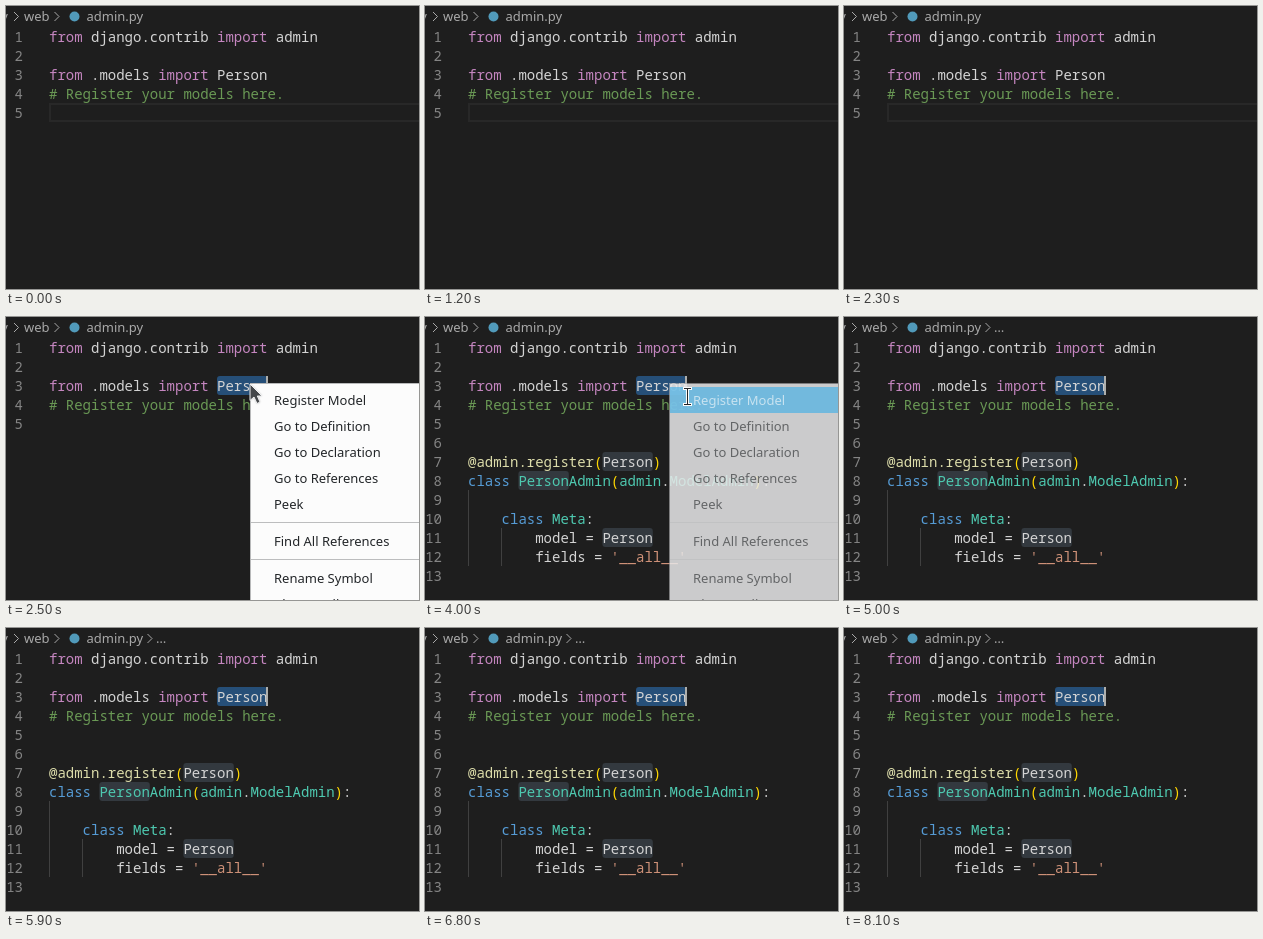
Recreate the animation shown at these times as an HTML page with a canvas. Size 413 by 283 pixels, loop 8.3 s.

```html
<!DOCTYPE html>
<html lang="en">
<head>
<meta charset="utf-8">
<title>Register model</title>
<style>
html, body { margin: 0; width: 100%; height: 100%; overflow: hidden; background: #1e1e1e; }
canvas { display: block; }
</style>
</head>
<body>
<canvas id="stage" width="413" height="283"></canvas>
<script>
const ctx = document.getElementById('stage').getContext('2d');
const W = 413, H = 283, LOOP = 8300, STEP = 100;
const LEFT = 43, TOP = 21, LINE = 19, CHAR = 8.4;
const MONO = '14px "Noto Sans Mono", monospace';
const SANS = '13px "Noto Sans", sans-serif';
const C = {
  bg: '#1e1e1e', text: '#d4d4d4', key: '#c586c0', comment: '#6a9955', cls: '#569cd6',
  type: '#4ec9b0', func: '#dcdcaa', str: '#ce9178', paren: '#ffd700', num: '#858585',
  crumb: '#a9a9a9', guide: '#404040', line: '#282828', caret: '#aeafad',
  select: '#264f78', idle: '#3a3d41', match: '#33393f', dim: '#2a2d30'
};

// Each line: alternating colour and text
const HEAD = [
  ['key', 'from', 'text', ' django.contrib ', 'key', 'import', 'text', ' admin'],
  [],
  ['key', 'from', 'text', ' .models ', 'key', 'import', 'text', ' Person'],
  ['comment', '# Register your models here.'],
  []
];
const ADDED = [
  [],
  ['func', '@admin.register', 'paren', '(', 'text', 'Person', 'paren', ')'],
  ['cls', 'class ', 'type', 'PersonAdmin', 'paren', '(', 'type', 'admin',
    'text', '.', 'type', 'ModelAdmin', 'paren', ')', 'text', ':'],
  [],
  ['cls', '    class ', 'type', 'Meta', 'text', ':'],
  ['text', '        model = Person'],
  ['text', '        fields = ', 'str', "'__all__'"],
  []
];
const MENU = ['Register Model', 'Go to Definition', 'Go to Declaration', 'Go to References',
  'Peek', '-', 'Find All References', '-', 'Rename Symbol', 'Change All Occurrences'];

// Pointer path: time, x, y
const PATH = [
  [600, 405, 61], [1000, 300, 68], [1400, 247, 67], [1500, 246, 67], [2200, 246, 67],
  [2300, 244, 67], [2800, 244, 67], [3300, 262, 79], [4900, 262, 79], [5200, 274, 72],
  [5400, 274, 72], [5900, 238, 34], [6300, 157, 3], [6800, 66, -4], [7200, 66, -4]
];

const lineTop = n => TOP + (n - 1) * LINE;
const colX = c => LEFT + c * CHAR;

function rect(x, y, w, h, color) {
  ctx.fillStyle = color;
  ctx.fillRect(x, y, w, h);
}

function label(str, x, y, color, font = SANS, align = 'left') {
  ctx.font = font;
  ctx.textAlign = align;
  ctx.fillStyle = color;
  ctx.fillText(str, x, y);
}

function wordBox(n, col, color) {
  ctx.fillStyle = color;
  ctx.beginPath();
  ctx.roundRect(colX(col), lineTop(n), 6 * CHAR, LINE, 3);
  ctx.fill();
}

function lineBox(n) {
  ctx.strokeStyle = C.line;
  ctx.lineWidth = 2;
  ctx.strokeRect(LEFT + 1, lineTop(n) + 1, W, LINE - 2);
}

function chevron(x) {
  ctx.strokeStyle = C.crumb;
  ctx.lineWidth = 1;
  ctx.beginPath();
  ctx.moveTo(x, 6);
  ctx.lineTo(x + 4.5, 10.5);
  ctx.lineTo(x, 15);
  ctx.stroke();
}

function breadcrumb(t) {
  label('y', 2, 15, C.crumb, SANS, 'right');
  chevron(8);
  label('web', 18, 15, C.crumb);
  chevron(48.5);
  ctx.fillStyle = '#519aba';
  ctx.beginPath();
  ctx.arc(68.5, 10.5, 5, 0, 7);
  ctx.fill();
  label('admin.py', 80.5, 15, C.crumb);
  if (t >= 4300) {
    chevron(141.5);
    label('…', 150, 15, C.crumb);
  }
}

function codeLine(parts, n) {
  const y = lineTop(n) + 15;
  label(String(n), 17, y, C.num, MONO, 'right');
  let col = 0;
  for (let i = 0; i < parts.length; i += 2) {
    label(parts[i + 1], colX(col), y, C[parts[i]], MONO);
    col += parts[i + 1].length;
  }
}

function caretOn(t) {
  if (t < 1900 || t >= 8100) return false;
  if (t >= 4000) return Math.floor((t - 4000) / 500) % 2 === 0;
  return !(t >= 2900 && t < 3300 || t >= 3800);
}

function editor(t) {
  const added = t >= 4000, blurred = t >= 8100;
  if (t < 1700) lineBox(5);
  else if (t < 1900) lineBox(3);
  else wordBox(3, 20, blurred ? C.idle : C.select);
  if (added) {
    const color = blurred ? C.dim : C.match;
    wordBox(7, 16, color);
    wordBox(8, 6, color);
    wordBox(11, 16, color);
    rect(LEFT, lineTop(9), 1, 4 * LINE, C.guide);
    rect(76, lineTop(11), 1, 2 * LINE, C.guide);
  }
  (added ? HEAD.concat(ADDED) : HEAD).forEach((parts, i) => codeLine(parts, i + 1));
  if (caretOn(t)) rect(260, lineTop(3), 2, LINE, C.caret);
}

function menuAlpha(t) {
  if (t < 2400 || t >= 4400) return 0;
  if (t < 2500) return 0.5;
  if (t < 4000) return 1;
  return [0.62, 0.36, 0.14, 0.03][Math.floor((t - 4000) / STEP)];
}

function menu(t) {
  ctx.globalAlpha = menuAlpha(t);
  if (!ctx.globalAlpha) return;
  rect(244, 66, W, H, '#b8b9ba');
  rect(245, 67, W, H, '#fcfcfc');
  let y = 70;
  MENU.forEach((item, i) => {
    if (item === '-') {
      rect(245, y + 5, W, 1, '#bcbdbe');
      y += 11;
      return;
    }
    const active = i === 0 && t >= 3000;
    if (active) rect(245, y, W, 26, '#3daee9');
    label(item, 268, y + 18, active ? '#fcfcfc' : '#232629');
    y += 26;
  });
  ctx.globalAlpha = 1;
}

function pointerAt(t) {
  const i = PATH.findIndex(p => p[0] > t);
  if (i < 1) return null;
  const [t0, x0, y0] = PATH[i - 1], [t1, x1, y1] = PATH[i];
  const k = (t - t0) / (t1 - t0);
  return [Math.round(x0 + (x1 - x0) * k), Math.round(y0 + (y1 - y0) * k)];
}

function arrow(x, y) {
  const p = new Path2D('M0 0V16.5L4 13L7 19.5L10 18L7.3 12H12Z');
  ctx.save();
  ctx.translate(x, y);
  ctx.shadowColor = 'rgba(0,0,0,.35)';
  ctx.shadowBlur = 2;
  ctx.fillStyle = '#44474a';
  ctx.fill(p);
  ctx.shadowColor = 'transparent';
  ctx.strokeStyle = '#eff0f1';
  ctx.lineWidth = 1;
  ctx.stroke(p);
  ctx.restore();
}

function beam(x, y) {
  for (const [color, pad] of [['#fcfcfc', 1], ['#232629', 0]]) {
    rect(x - pad, y - 8 - pad, 1 + 2 * pad, 17 + 2 * pad, color);
    for (const end of [-8, 8])
      rect(x - 3 - pad, y + end - pad, 7 + 2 * pad, 1 + 2 * pad, color);
  }
}

function pointer(t) {
  const p = pointerAt(t);
  if (!p) return;
  const overMenu = t >= 2300 && t < 4000;
  (overMenu || p[1] < TOP ? arrow : beam)(p[0], p[1]);
}

function draw(now) {
  const t = Math.floor(now % LOOP / STEP) * STEP;
  rect(0, 0, W, H, C.bg);
  breadcrumb(t);
  editor(t);
  menu(t);
  pointer(t);
}

const start = performance.now();
function tick() {
  draw(performance.now() - start);
  requestAnimationFrame(tick);
}
tick();
</script>
</body>
</html>
```
